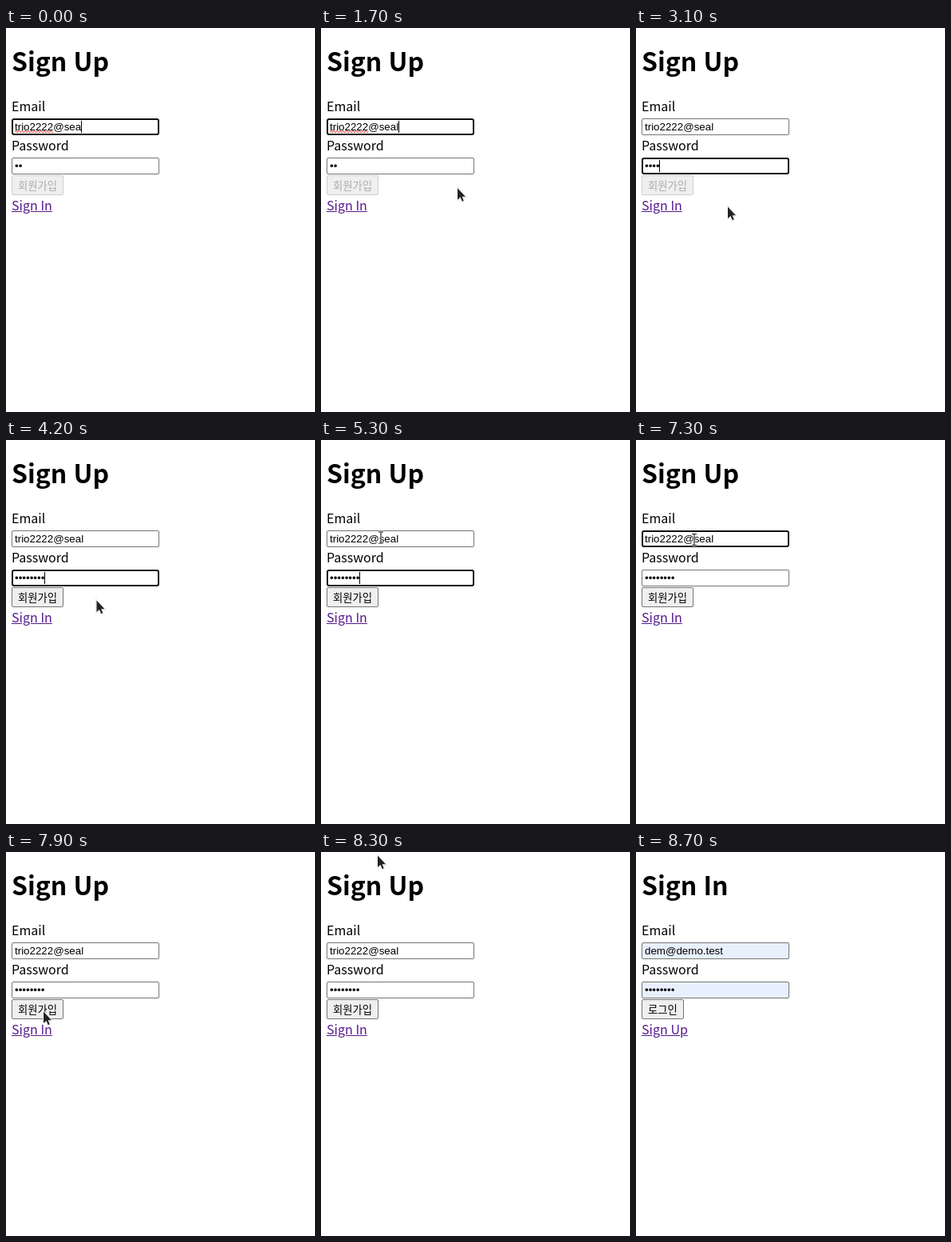
An HTML page that plays this animation: 387 px wide and 480 px high, repeating every 9400 ms.

```html
<!DOCTYPE html>
<html lang="ko">
<head>
<meta charset="utf-8">
<title>Sign Up</title>
<style>
  html, body { margin: 0; width: 100%; height: 100%; overflow: hidden; background: #fff; }
  body {
    position: relative; color: #000; word-spacing: -.05em;
    font: 16px/24px "Noto Sans CJK KR", "Noto Sans CJK JP", "Noto Sans CJK", sans-serif;
  }
  body > * { position: absolute; left: 7px; margin: 0; white-space: pre; box-sizing: border-box; }
  h1 { top: 17px; font-size: 32px; font-weight: bold; line-height: 46px; }
  #link { top: 209px; color: #551a8b; text-decoration: underline; }
  .field {
    width: 185px; height: 21px; padding: 2px 3px; border: 1px solid #767676; border-radius: 2px;
    font: 13.333px/15px "Liberation Sans", Arial, sans-serif; background: #fff;
  }
  .field.focus { padding: 1px 2px; border: 2px solid #101010; border-radius: 3px; }
  .field.filled { background: #e8f0fe; }
  #email { top: 113px; }
  #password { top: 162px; }
  #button {
    top: 184px; height: 25px; padding: 2px 7px; border: 1px solid #767676; border-radius: 2px;
    background: #efefef; font-size: 13.333px; line-height: 19px;
  }
  #button.disabled { color: #acacac; border-color: #cfcfcf; }
  #caret { width: 1px; height: 15px; background: #000; }
  svg { left: 0 !important; top: 0; width: 387px; height: 480px; overflow: hidden; }
  #squiggle { fill: none; stroke: #f00; stroke-width: .9; }
  #arrow { fill: #222; stroke: #fff; stroke-width: 2; paint-order: stroke; filter: drop-shadow(0 .5px .7px #0006); }
  #beam { fill: none; }
</style>
</head>
<body>
<h1 id="title"></h1>
<div style="top:85px">Email</div>
<div id="email" class="field"></div>
<div style="top:134px">Password</div>
<div id="password" class="field"></div>
<div id="button"></div>
<div id="link"></div>
<div id="caret"></div>
<svg>
  <path id="squiggle"/>
  <path id="arrow" d="M1 1.5V16L4.5 12.9 6.8 18.2 8.8 17.3 6.6 12.2H11Z"/>
  <g id="beam">
    <path d="M-3 -7H3M0 -7V7M-3 7H3" stroke="#fff" stroke-width="2.6"/>
    <path d="M-3 -7H3M0 -7V7M-3 7H3" stroke="#222" stroke-width="1.2"/>
  </g>
</svg>
<script>
const LOOP = 9400, STEP = 100;
const $ = id => document.getElementById(id);
const [title, email, password, button, link, caret, squiggle, arrow, beam] =
  ['title', 'email', 'password', 'button', 'link', 'caret', 'squiggle', 'arrow', 'beam'].map($);

// What the user does; every action also restarts the caret blink.
const ACTIONS = [
  { at: 0, page: 'Sign Up', other: 'Sign In', label: '회원가입', focus: 'email', address: 'trio2222@sea' },
  { at: 500, address: 'trio2222@seal' },
  { at: 2100, focus: 'password' },
  { at: 4500, focus: 'email' },
  { at: 5200, focus: 'password' },
  { at: 5500, focus: 'email', index: 9 },
  { at: 6000, address: 'trio2222seal', index: 8 },
  { at: 6800, address: 'trio2222@seal', index: 9 },
  { at: 7700, focus: '' },
  { at: 8400, page: 'Sign In', other: 'Sign Up', label: '로그인', address: '' },
  { at: 8600, address: 'dem@demo.test', filled: true }
];

// Straight pointer moves, with rests between them.
const MOVES = [
  { from: 1500, to: 2100, x: 80, y: 166 },
  { from: 2900, to: 3100, x: 114, y: 222 },
  { from: 4100, to: 4500, x: 108, y: 130 },
  { from: 4900, to: 5000, x: 75, y: 122 },
  { from: 5400, to: 5500, x: 73, y: 124.5 },
  { from: 7300, to: 7600, x: 64, y: 226 },
  { from: 7600, to: 7700, x: 46, y: 198 },
  { from: 8000, to: 8200, x: 158, y: 208 },
  { from: 8200, to: 8300, x: 70, y: 3 }
];

const clamp = (v, lo, hi) => Math.min(hi, Math.max(lo, v));
const stateAt = t => Object.assign({}, ...ACTIONS.filter(a => a.at <= t));
const typedDots = t => clamp(3 + Math.floor((t - 2930) / 170), 2, 8);
const dotsAt = t => stateAt(t).address ? typedDots(t) : 0;
const isValid = t => stateAt(t).address.includes('@') && dotsAt(t) === 8;

function pointerAt(t) {
  const typing = t >= 6000 && t < 7300;
  if (t < 1500 || typing || t >= 8400) return null;
  return MOVES.reduce((p, m) => {
    const k = clamp((t - m.from) / (m.to - m.from), 0, 1);
    return { x: p.x + (m.x - p.x) * k, y: p.y + (m.y - p.y) * k };
  }, { x: 215, y: 215 });
}

const pen = document.createElement('canvas').getContext('2d');
pen.font = '13.333px "Liberation Sans", Arial, sans-serif';
const textWidth = text => pen.measureText(text).width;

squiggle.setAttribute('d', 'M11 129.5q1 -2.4 2 0' + 't2 0'.repeat(23));

const show = (el, on) => { el.style.display = on ? '' : 'none'; };
const setText = (el, text) => { if (el.textContent !== text) el.textContent = text; };

function draw(t) {
  const s = stateAt(t), dots = dotsAt(t), secret = '•'.repeat(dots);
  const typingSecret = t >= 3000 && t < 4400;
  setText(title, s.page);
  setText(link, s.other);
  setText(button, s.label);
  setText(email, s.address);
  setText(password, secret);
  button.classList.toggle('disabled', !(isValid(t) && isValid(Math.max(0, t - STEP))));
  for (const field of [email, password]) {
    field.classList.toggle('focus', field.id === s.focus);
    field.classList.toggle('filled', !!s.filled);
  }
  show(squiggle, t < 2100);

  const before = s.focus === 'email' ? s.address.slice(0, s.index) : secret;
  show(caret, s.focus && (typingSecret || (t - s.at) % 1000 <= 500));
  caret.style.left = Math.floor(11 + textWidth(before)) + 'px';
  caret.style.top = s.focus === 'email' ? '116px' : '165px';

  const p = pointerAt(t);
  const overField = p && p.x < 192 && (p.y >= 113 && p.y < 134 || p.y >= 162 && p.y < 183);
  show(arrow, p && !overField);
  show(beam, overField);
  if (p) (overField ? beam : arrow).setAttribute('transform', `translate(${p.x} ${p.y})`);
}

const start = performance.now();
function frame() {
  const t = (performance.now() - start) % LOOP;
  draw(Math.floor(t / STEP) * STEP);
  requestAnimationFrame(frame);
}
frame();
</script>
</body>
</html>
```
